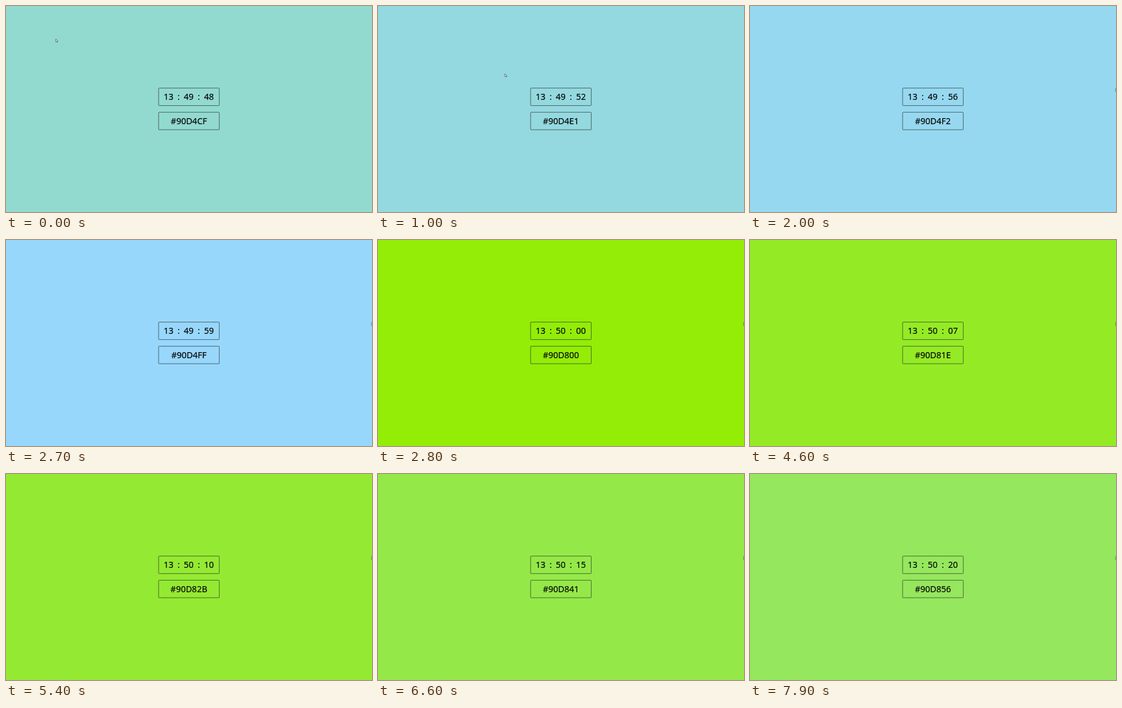
Write an HTML page that moves like this. It is 600 px wide and 338 px high and loops after 8 s.

```html
<!DOCTYPE html>
<html lang="en">
<head>
<meta charset="utf-8">
<title>Colour clock</title>
<style>
  html, body { margin: 0; width: 100%; height: 100%; overflow: hidden; }
  svg { display: block; width: 100vw; height: 100vh; }
  .box { fill: none; stroke: #2b2b2b; stroke-opacity: .68; }
  text {
    font: 14px "Noto Sans", "Open Sans", sans-serif;
    text-anchor: middle; fill: #080808; stroke: #080808; stroke-width: .2px;
  }
  #time { word-spacing: 3px; }
</style>
</head>
<body>
<svg viewBox="0 0 600 338">
  <rect id="bg" width="600" height="338"/>
  <rect class="box" x="250.2" y="134.7" width="99.4" height="28.7" rx="1"/>
  <rect class="box" x="250.2" y="174.3" width="99.4" height="28.7" rx="1"/>
  <text id="time" x="299.6" y="154.1"></text>
  <text id="hex" x="299.8" y="193.7"></text>
  <path id="pointer" d="M0 0V5L1.2 4L2 5.7L2.8 5.3L2 3.7L3.5 3.6Z" fill="#eef6f5" stroke="#333" stroke-width=".6"/>
</svg>
<script>
const LOOP = 8000, FRAME = 100, TICK = 250, LEAD = 200;
const START = (13 * 60 + 49) * 60 + 48;

// pointer keys: time, x, y
const PATH = [[0, 81.7, 54], [600, 556, 124], [1000, 208, 111], [1800, 599.4, 135.5]];

const el = id => document.getElementById(id);
const pad = n => String(n).padStart(2, "0");
const channel = (value, max) =>
  Math.round(value / max * 255).toString(16).toUpperCase().padStart(2, "0");
const ease = p => p * p * (3 - 2 * p);

function pointerAt(t) {
  const i = PATH.findIndex(key => key[0] > t);
  if (i < 0) return PATH[PATH.length - 1].slice(1);
  const a = PATH[i - 1], b = PATH[i];
  const p = ease((t - a[0]) / (b[0] - a[0]));
  return [a[1] + (b[1] - a[1]) * p, a[2] + (b[2] - a[2]) * p];
}

function background(m, s) {
  const rgb = m === 49
    ? [146 + (s - 48) * .5, 218 - (s - 48) * .25, 207 + (s - 48) * 4.1]
    : [147 + s * .08, 237 - s * .3, 7 + s * 4.3];
  return `rgb(${rgb.map(Math.round).join(",")})`;
}

function draw(now) {
  const t = Math.floor(now % LOOP / FRAME) * FRAME;
  const total = START + Math.floor((t + LEAD) / TICK);
  const h = Math.floor(total / 3600), m = Math.floor(total / 60) % 60, s = total % 60;
  el("bg").setAttribute("fill", background(m, s));
  el("time").textContent = [h, m, s].map(pad).join(" : ");
  el("hex").textContent = "#" + channel(h, 23) + channel(m, 59) + channel(s, 59);
  el("pointer").setAttribute("transform", `translate(${pointerAt(t)})`);
}

const begin = performance.now();
function loop() {
  draw(performance.now() - begin);
  requestAnimationFrame(loop);
}
loop();
</script>
</body>
</html>
```
